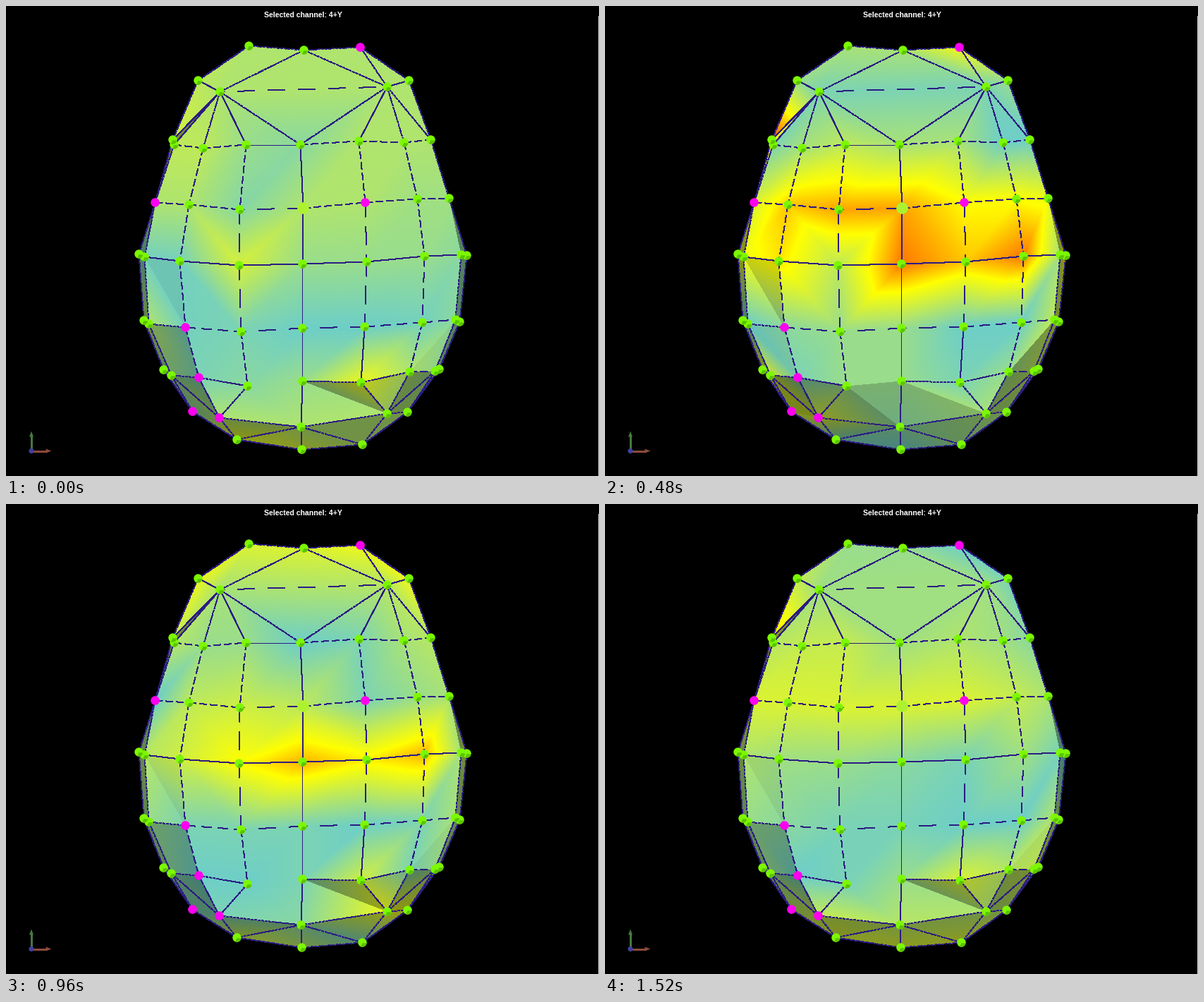
A matplotlib script for the animation above (1.6 s loop, 841 by 666 pixels).

```python
import numpy as np
import matplotlib.pyplot as plt
from matplotlib.animation import FuncAnimation
from matplotlib.patches import Circle, Polygon, Wedge

W, H, DPI = 841, 666, 64
PX = 72 / DPI            # points per pixel
FRAMES, CYCLE = 20, 10

# Electrode positions by row, front to back
ROWS = {
    "T": [(344, 56), (422, 62), (502, 58)],
    "U": [(272, 105), (303, 121), (540, 114), (571, 105)],
    "A": [(236, 189), (238, 196), (279, 201), (340, 196), (417, 196),
          (500, 191), (564, 193), (602, 189)],
    "B": [(211, 278), (259, 281), (331, 288), (421, 286), (509, 278),
          (583, 273), (628, 272)],
    "C": [(188, 351), (196, 355), (246, 361), (330, 367), (420, 365),
          (511, 362), (593, 354), (645, 352), (653, 353)],
    "D": [(195, 445), (202, 450), (254, 455), (333, 461), (420, 456),
          (508, 454), (590, 448), (637, 444), (643, 447)],
    "E": [(223, 515), (234, 523), (273, 526), (342, 538), (420, 531),
          (503, 533), (572, 518), (608, 517), (614, 514)],
    "F": [(264, 574), (302, 583), (418, 596), (540, 577), (569, 575)],
    "G": [(327, 614), (419, 628), (505, 621)],
}
NAMES = [row + str(i) for row, pts in ROWS.items() for i in range(len(pts))]
INDEX = {name: i for i, name in enumerate(NAMES)}
POS = np.array([p for pts in ROWS.values() for p in pts], float)
MARKED = {"T2", "B0", "B4", "D2", "E2", "F0", "F1"}
SELECTED = "B3"


def activity(default, levels):
    """Level per electrode: 0 is teal, 1 yellow, 2 red."""
    values = np.full(len(NAMES), default)
    for level, names in levels.items():
        values[[INDEX[n] for n in names.split()]] = level
    return values


KEY_PHASES = [0, 2, 6, 9, CYCLE]
KEYS = [
    activity(.45, {
        0: "D4 D5", .05: "C1 C2 D2 D6", .1: "C0 D3 E2", .17: "B2",
        .2: "A4 C7 C8 D7 D8 E3 F0", .3: "A3 C4 C5 C6 E0 E1 E4 E7 E8",
        .35: "B5 B6", .55: "U0 A1 A2", .7: "A0 C3 G1", .87: "E5 G0"}),
    activity(.4, {
        0: "A4 B0 D5 E2 E3", .1: "A5 B4 D2 D3 D4 D6 E4 E6 F0 F1 G2",
        .2: "E1 F2", .3: "A2 A3 B5 D0 D1 E7 E8", .5: "U2 A1 A7 C1 G1",
        .55: "B1 B3", .67: "A0 B2 C2 C8 E5 G0", .75: "T0 T1",
        .88: "T2 U0 U3 F3 F4", 1: "C3", 1.06: "C5", 1.3: "C4 C6"}),
    activity(.4, {
        0: "A6 A7 D1 D5 D6 G1", .1: "U1 U2 A1 D0 E2 E5 G0", .2: "D2 F2",
        .3: "U0 U3 D3 D4 E3 E4 E6 G2", .55: "A3 C3 D7 E7 E8",
        .75: "B0 C0 D8 E1 F0 F1", .9: "T2 B6 C1 E0", 1: "B4 B5",
        1.1: "C2 C8", 1.22: "B1 C5", 1.36: "B2 B3", 1.53: "C4 C6",
        1.75: "A0"}),
    activity(.35, {
        0: "T2 C8 D5 D6 E2", .08: "U3 C5 C7 D3 D4 E3", .2: "A7 C4 D2",
        .3: "T0 T1 C3 D0 D1 E0 E1 E4", .45: "A5 B6 C0 C1 D7 F3",
        .5: "A1 E6 F0 F2 F4", .6: "U0 A2 A3 B5 E7 E8 F1",
        .75: "B0 B1 B2 B3 B4 E5 G0 G1 G2", 1.2: "A0"}),
]
KEYS.append(KEYS[0])

# Polygons are fanned from their first corner;
# the two numbers are the brightness in either lighting state
MESH = [
    (1, 1, """U1U0T0T1 T1U1U2 U2T1T2U3 U1U0A0 U1A1A2 U1A2A3 U1A3A4 U1A4U2
        U2A4A5 U2A5A6 U2A6A7U3 A2B1B0A1 A3B2B1A2 A4B3B2A3 A5B4B3A4 A6B5B4A5
        A7B6B5A6 B1C2C1B0 B1B2C3C2 B3C4C3B2 B3B4C5C4 B5C6C5B4 B6C7C6B5
        C1D2D1 C2C3D3D2 C4D4D3C3 C5D5D4C4 C6D6D5C5 C7D7D6C6 D3E3E2D2
        D4E4E3D3 D5E5E4D4 D6E6E5D5 D7E6D6"""),
    (.6, 1, "U1A0A1 A0A1B0"),
    (.6, .6, "B0C0C1 C0D0D1C1 D0E0E1D1 C7C8D8D7 D7D8E8E7 B6C8C7"),
    (.94, .83, "C1C2D2"),
    (.72, .93, "D1D2E2E1"),
    (.6, .55, "E1E0F0F1 E1E2F1"),
    (1, .65, "E2E3F1 E3F2F1"),
    (1, .8, "E3E4F2 E4F3F2"),
    (.66, 1, "E4E5F3"),
    (.82, 1, "E5E6F3"),
    (.95, .65, "D7E7E6"),
    (.6, .6, "E6E7F3 E7E8F4F3 F0F1G0 F1F2G0"),
    (.64, .64, "F2G1G0 F2G2G1 F2F3G2 F3F4G2"),
]

SOLID = "solid"
DOTS, DASHES, MEDIUM = (0, (3, 1)), (0, (10, 4)), (0, (14, 8))
LONG, UPRIGHT = (18, (24, 18)), (6, (26, 13))
LINES = [
    (SOLID, "U0U1A0 U2U3 U1A1 U1A3A4 U2A5 A4B3C4D4E4F2G1 "
            "C0C1C2C3C4C5C6C7C8 D5E5"),
    (DOTS, "U0T0T1T2U3A7B6C8D8E8F4G2G1G0F0E0D0C0B0A0U0 U1T1U2T2 U1A2 "
           "U1A4U2A6 U2A7 A1B0C1D1E1F0 C7D7E7F4 E0E1E2E3F1E2 E1F1F2F3E6 "
           "E4E5E6 E5F3E7 F1G0F2G2F3F4 D1D2"),
    (DASHES, "A1A2A3 A4A5A6A7 A2B1C2D2E2 A3B2 A5B4 A6B5C6 B0B1B2 "
             "B3B4B5B6 D3E3 D6E6 E6E7"),
    (MEDIUM, "D2D3 D5D6D7 C6D6"),
    (LONG, "U1U2 B2B3 D3D4D5"),
    (UPRIGHT, "B2C3D3 B4C5D5"),
]


def nodes(text):
    """Split a chain such as 'A1B2C3' into node indices."""
    return [INDEX[text[i:i + 2]] for i in range(0, len(text), 2)]


def build_triangles():
    tris, shades = [], []
    for first, second, polys in MESH:
        for poly in polys.split():
            n = nodes(poly)
            for b, c in zip(n[1:], n[2:]):
                tris.append((n[0], b, c))
                shades.append((first, second))
    return np.array(tris), np.array(shades)


def rasterize(tris):
    """Triangle number and barycentric weights for every pixel."""
    owner = np.full((H, W), -1)
    weight = np.zeros((H, W, 3))
    for t, tri in enumerate(tris):
        (ax, ay), (bx, by), (cx, cy) = corners = POS[tri]
        x0, y0 = corners.min(0).astype(int)
        x1, y1 = corners.max(0).astype(int) + 1
        y, x = np.mgrid[y0:y1, x0:x1]
        det = (by - cy) * (ax - cx) + (cx - bx) * (ay - cy)
        if det == 0:
            continue
        wa = ((by - cy) * (x - cx) + (cx - bx) * (y - cy)) / det
        wb = ((cy - ay) * (x - cx) + (ax - cx) * (y - cy)) / det
        w = np.stack([wa, wb, 1 - wa - wb], -1)
        hit = (w >= -1e-9).all(-1)
        owner[y[hit], x[hit]] = t
        weight[y[hit], x[hit]] = w[hit]
    return owner, weight


def colorize(v):
    stops = [-1, 0, 1, 2]
    channels = [(0, 110, 255, 255), (130, 207, 255, 0), (255, 200, 0, 0)]
    return np.stack([np.interp(v, stops, c) for c in channels], -1)


TRIS, SHADES = build_triangles()
owner, weight = rasterize(TRIS)
inside = owner >= 0
pix_tri, pix_weight = owner[inside], weight[inside]


def surface(i):
    phase = i % CYCLE
    k = np.searchsorted(KEY_PHASES, phase, side="right") - 1
    t = (phase - KEY_PHASES[k]) / (KEY_PHASES[k + 1] - KEY_PHASES[k])
    values = KEYS[k] * (1 - t) + KEYS[k + 1] * t
    light = SHADES[:, int(4 <= i < CYCLE)]
    v = (values[TRIS[pix_tri]] * pix_weight).sum(1)
    img = np.zeros((H, W, 3), np.uint8)
    img[inside] = colorize(v) * light[pix_tri][:, None]
    return img


fig = plt.figure(figsize=(W / DPI, H / DPI), dpi=DPI, facecolor="black")
ax = fig.add_axes([0, 0, 1, 1])
image = ax.imshow(surface(0), interpolation="nearest", aspect="auto")
ax.set(xlim=(-.5, W - .5), ylim=(H - .5, -.5))
ax.axis("off")


def draw_lines():
    for style, chains in LINES:
        for chain in chains.split():
            n = nodes(chain)
            for pair in zip(n, n[1:]):
                x, y = POS[list(pair)].T
                ax.plot(x, y, color="#2c1c82", lw=PX, ls=style,
                        antialiased=False, dash_capstyle="butt", zorder=2)


def draw_electrodes():
    for name, p in zip(NAMES, POS):
        if name == SELECTED:
            ax.add_patch(Circle(p, 8.3, fc="#adf22f", lw=0, zorder=4))
        elif name in MARKED:
            ax.add_patch(Circle(p, 6.3, fc="#ff00f0", lw=0, zorder=4))
        else:
            ax.add_patch(Circle(p, 6.2, fc="#7cf800", lw=0, zorder=4))
            ax.add_patch(Wedge(p + (0, .5), 5.7, 5, 115, fc="#5bc400",
                               lw=0, zorder=5))


def draw_gizmo():
    green, red = "#47783f", "#8c4a3c"
    ax.plot([35.5, 35.5], [630, 609], color=green, lw=3 * PX, zorder=3)
    ax.add_patch(Polygon([(32.5, 610), (38.5, 610), (35.5, 602)], fc=green, lw=0))
    ax.plot([36, 57], [630, 630], color=red, lw=3 * PX, zorder=3)
    ax.add_patch(Polygon([(56, 627), (56, 633), (64, 630)], fc=red, lw=0))
    ax.add_patch(Circle((35.5, 630), 3.6, fc="#40409c", lw=0, zorder=4))


draw_lines()
draw_electrodes()
draw_gizmo()
ax.plot([840, 840], [13, H], color="#c8c8c8", lw=PX, antialiased=False)
ax.text(420.5, 16, "Selected channel: 4+Y", color="white", ha="center",
        va="baseline", family="Liberation Sans", weight="bold", size=10.5 * PX)


def update(i):
    image.set_data(surface(i))
    return [image]


anim = FuncAnimation(fig, update, frames=FRAMES, interval=80, repeat=True,
                     repeat_delay=0, blit=False)
plt.show()
```
